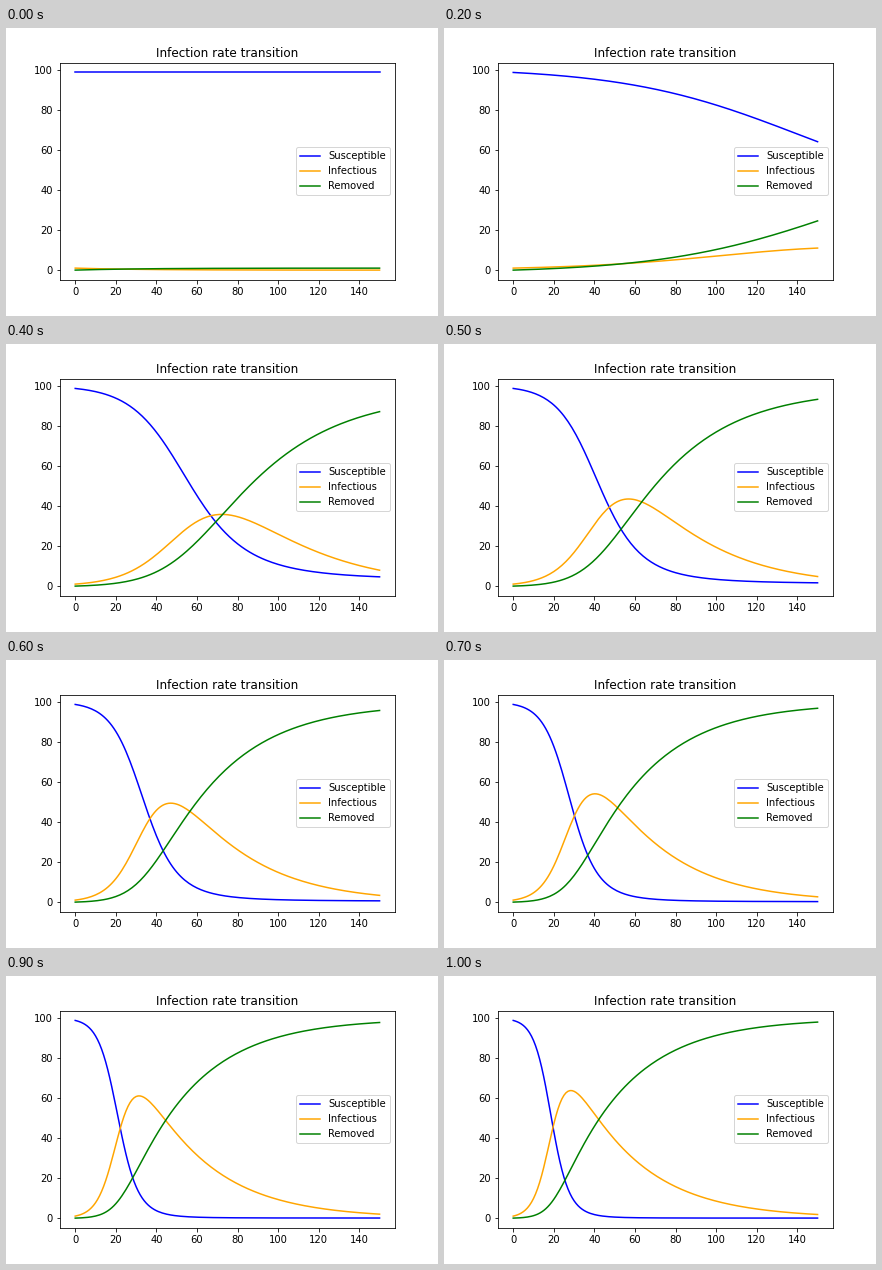
These frames come from a looping animation (432x288 px, 1050 ms). A matplotlib script:

```python
import numpy as np
import matplotlib.pyplot as plt
from matplotlib.animation import FuncAnimation

FRAMES, INTERVAL = 21, 50
DAYS = np.arange(151)
SUBSTEPS = 4
GAMMA = 0.031          # removal rate per day
R0_STEP = 0.4375       # reproduction number gained per frame


def slope(y, beta):
    s, i, _ = y
    infected, removed = beta * s * i / 100, GAMMA * i
    return np.array([-infected, infected - removed, removed])


def simulate(beta):
    """Integrate the SIR model (percentages) with Runge-Kutta steps."""
    y = np.array([99.0, 1.0, 0.0])
    h = 1 / SUBSTEPS
    rows = [y]
    for _ in DAYS[1:]:
        for _ in range(SUBSTEPS):
            k1 = slope(y, beta)
            k2 = slope(y + h / 2 * k1, beta)
            k3 = slope(y + h / 2 * k2, beta)
            k4 = slope(y + h * k3, beta)
            y = y + h / 6 * (k1 + 2 * k2 + 2 * k3 + k4)
        rows.append(y)
    return np.array(rows).T


plt.rcParams["font.family"] = "DejaVu Sans"
fig, ax = plt.subplots(figsize=(6, 4), dpi=72)
fig.subplots_adjust(left=0.125, right=0.9, bottom=0.125, top=0.88)
ax.set_title("Infection rate transition")
ax.set_xlim(-7.5, 157.5)
ax.set_ylim(-4.95, 103.95)

series = [("Susceptible", "blue"), ("Infectious", "orange"), ("Removed", "green")]
lines = [ax.plot([], [], color=color, label=label)[0] for label, color in series]
ax.legend(loc="center right")


def update(n):
    for line, values in zip(lines, simulate(R0_STEP * GAMMA * n)):
        line.set_data(DAYS, values)
    return lines


anim = FuncAnimation(fig, update, frames=FRAMES, interval=INTERVAL,
                     repeat=True, repeat_delay=0)
plt.show()
```
